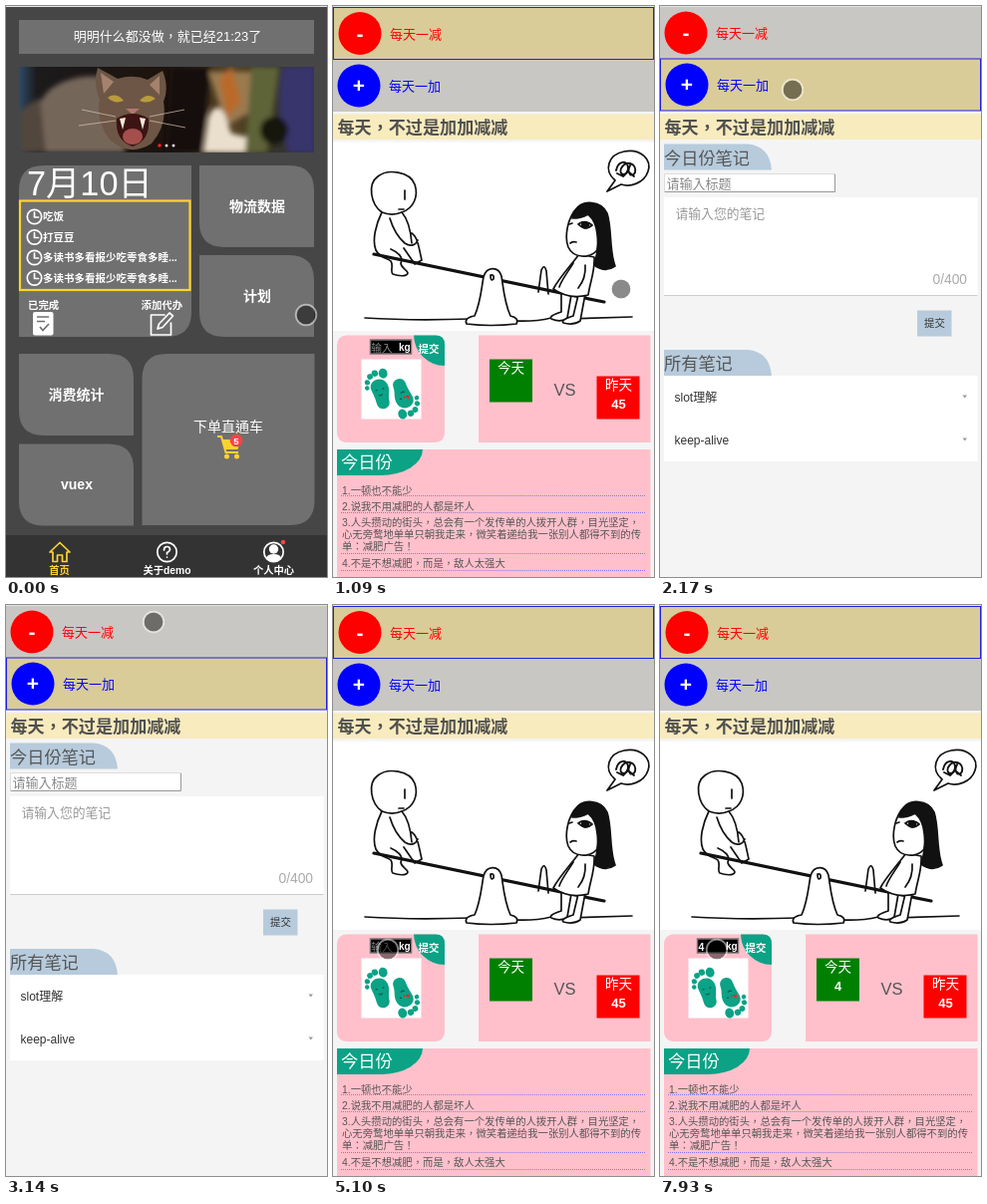
An HTML page that plays this animation: 322 px wide and 573 px high, repeating every 8 s.

```html
<!DOCTYPE html>
<html lang="zh-Hant">
<head>
<meta charset="utf-8">
<title>每天加减</title>
<style>
  html, body { margin: 0; width: 100%; height: 100%; overflow: hidden; background: #f4f4f4; }
  svg { display: block; width: 100vw; height: 100vh; }
  text { font-family: "Liberation Sans", "Noto Sans CJK TC", "Noto Sans CJK SC", sans-serif; white-space: pre; }
  .mid { text-anchor: middle; }
  .home text { fill: #fff; }
  .card { fill: #707070; }
  .b { font-weight: 700; }
  .line { fill: none; stroke: #fff; stroke-width: 1.7; stroke-linecap: round; stroke-linejoin: round; }
  .ink { fill: none; stroke: #111; stroke-width: 1.7; stroke-linecap: round; stroke-linejoin: round; }
  .pink { fill: #ffc0cb; }
  .teal { fill: #0ba286; }
  .blue { fill: #b7cbdc; }
  .list text { font-size: 10.35px; fill: #555; }
  .dots { fill: none; stroke: #8a78e8; stroke-dasharray: 1 1; }
  .tab { font-size: 17.2px; fill: #555; }
</style>
</head>
<body>
<svg viewBox="0 0 322 573">
  <defs>
    <clipPath id="photo"><rect x="13" y="61" width="296" height="86"/></clipPath>
    <filter id="soft"><feGaussianBlur stdDeviation="2.5"/></filter>
    <linearGradient id="scene">
      <stop offset="0" stop-color="#2f4a68"/><stop offset=".06" stop-color="#1c1a1c"/>
      <stop offset=".5" stop-color="#1d130d"/><stop offset=".72" stop-color="#5a4526"/>
      <stop offset=".84" stop-color="#35351f"/><stop offset="1" stop-color="#35305c"/>
    </linearGradient>
    <g id="clock" class="line"><circle r="7.2"/><path d="M0-4.5V.5H4"/></g>
    <path id="small" class="card" d="M0 0H90Q115 0 115 25V82H25Q0 82 0 57Z"/>
    <path id="large" class="card" d="M25 0H173V147Q173 172 148 172H0V25Q0 0 25 0Z"/>
    <path id="flag" class="blue" d="M0 0H84Q106 2 108 26H0Z"/>
    <g id="foot" class="teal">
      <path d="M-8-4C-9-14 6-16 9-6C11 1 7 5 7 11C7 20-6 20-6 11C-6 5-7 2-8-4Z"/>
      <circle cx="-10" cy="-12" r="2.6"/><circle cx="-6" cy="-17" r="2.9"/>
      <circle cx="-.5" cy="-19" r="3.2"/><ellipse cx="7.5" cy="-17" rx="4.4" ry="5"/>
      <circle cx="-11.5" cy="-6.5" r="2.3"/>
      <path d="M-4-2h2M3-2h2M-2 3q2 2 4 0" fill="none" stroke="#064f42"/>
    </g>
  </defs>

  <g id="home" class="home">
    <rect width="322" height="573" fill="#464646"/>
    <rect class="card" x="13" y="14" width="296" height="34"/>
    <text class="mid" x="162" y="35" font-size="13">明明什么都没做，就已经21:23了</text>

    <g clip-path="url(#photo)">
      <rect x="13" y="61" width="296" height="86" fill="url(#scene)"/>
      <g filter="url(#soft)">
        <path d="M30 147Q22 104 44 84Q68 66 104 72L120 147Z" fill="#75665a"/>
        <path d="M13 105L34 92L40 147H13Z" fill="#51463c"/>
        <path d="M165 61H206L196 147H160Z" fill="#120d0b"/>
        <path d="M203 66H262L250 104L221 120Z" fill="#9a7a50"/>
        <path d="M198 147L203 112Q210 94 219 108L226 128L244 132V147Z" fill="#eadfcd"/>
        <path d="M214 74L226 61L236 96L222 112Z" fill="#b96a2c"/>
        <path d="M246 61H274L262 147H240Z" fill="#5e6437"/>
        <path d="M278 61H309V147H284Q268 102 278 61Z" fill="#39346c"/>
        <circle cx="269" cy="125" r="14" fill="#17140f"/>
      </g>
      <path d="M92 62L112 73Q128 68 142 74L157 65Q164 82 158 96Q162 120 146 138Q124 152 104 134Q90 116 94 94Q87 78 92 62Z" fill="#6d5645"/>
      <path d="M95 67L108 76L98 88ZM154 70L144 79L154 89Z" fill="#a5826e"/>
      <path d="M102 92Q110 86 118 95Q109 99 102 92ZM134 95Q142 86 150 93Q142 99 134 95Z" fill="#b99c3c"/>
      <path d="M120 103H134L127 109Z" fill="#b2786d"/>
      <path d="M111 113Q127 103 143 113Q145 135 127 141Q109 135 111 113Z" fill="#3c1413"/>
      <ellipse cx="127" cy="131" rx="10" ry="8" fill="#a54f4d"/>
      <path d="M114 113L117 124L120 112M134 112L137 124L140 113" fill="#f4ead7"/>
      <path d="M110 111L76 104M110 115L73 120M144 111L179 104M144 115L180 122" stroke="#d7c8b6" stroke-width=".7"/>
    </g>
    <circle cx="154" cy="140" r="1.7" fill="#f22"/>
    <circle cx="161" cy="140" r="1.5" fill="#ddd"/><circle cx="168" cy="140" r="1.5" fill="#ddd"/>

    <use href="#large" x="13" y="160"/>
    <use href="#small" x="194" y="160"/><use href="#small" x="194" y="250"/>
    <use href="#small" x="13" y="349"/><use href="#small" x="13" y="439.500"/>
    <use href="#large" x="136.500" y="349"/>

    <text x="21" y="190" font-size="34.300" font-weight="300">7月10日</text>
    <rect x="14" y="195.500" width="170.500" height="89.500" fill="none" stroke="#fdd330" stroke-width="2.200"/>
    <g class="b" font-size="10.500">
      <use href="#clock" x="28.500" y="211.500"/><text x="37" y="215">吃饭</text>
      <use href="#clock" x="28.500" y="232"/><text x="37" y="236">打豆豆</text>
      <use href="#clock" x="28.500" y="252.500"/><text x="37" y="256">多读书多看报少吃零食多睡...</text>
      <use href="#clock" x="28.500" y="273"/><text x="37" y="277">多读书多看报少吃零食多睡...</text>
    </g>
    <g class="b" font-size="10.400"><text x="22" y="304">已完成</text><text x="135.500" y="304">添加代办</text></g>
    <rect x="27" y="307" width="20.500" height="23.500" rx="2" fill="#fff"/>
    <path d="M31 312H43M31 316.500H39M34 322L37 325.500L43 319" fill="none" stroke="#707070" stroke-width="1.700"/>
    <path class="line" d="M159 310H145.500V330H165.500V318M152 324L153.500 319L164 308L167.500 311L157 322.500Z"/>

    <g class="b mid" font-size="14">
      <text x="252" y="206">物流数据</text><text x="252" y="296">计划</text>
      <text x="70.500" y="395">消费统计</text><text x="71" y="485">vuex</text>
      <text x="223" y="427" font-weight="400">下单直通车</text>
    </g>
    <path d="M212 432H216L220.500 448H233" fill="none" stroke="#fdd330" stroke-width="2"/>
    <path d="M216.500 435H235L232.500 445H219.500Z" fill="#fdd330"/>
    <circle cx="221.500" cy="452" r="2.500" fill="#fdd330"/><circle cx="231.500" cy="452" r="2.500" fill="#fdd330"/>
    <circle cx="231" cy="436" r="6.300" fill="#f44545"/>
    <text class="mid b" x="231" y="439.500" font-size="9.500">5</text>

    <rect y="531" width="322" height="42" fill="#333"/>
    <path class="line" style="stroke:#fdd330" d="M44 548L54 538.500L64 548H61V557.500H56.500V551H51.500V557.500H47V548Z"/>
    <g class="line"><circle cx="161.500" cy="548" r="9.700"/><path d="M158.500 546Q158.500 542.500 161.500 542.500T164.500 545.500Q164 547.500 161.500 548.500V550M161.500 553V553.100"/></g>
    <circle class="line" cx="268.500" cy="548" r="9.700"/>
    <circle cx="268.500" cy="545" r="4.700" fill="#fff"/>
    <path d="M261 554Q262 550 268.500 550T276 554Q268.500 561 261 554Z" fill="#fff"/>
    <circle cx="278" cy="538" r="2.300" fill="#f44545"/>
    <g class="b mid" font-size="10.300">
      <text x="53.500" y="569.500" style="fill:#fdd330">首页</text>
      <text x="161.500" y="569.500">关于demo</text><text x="268.500" y="569.500">个人中心</text>
    </g>
  </g>

  <g id="daily">
    <rect width="322" height="573" fill="#f4f4f4"/>
    <g id="rows"></g>
    <rect y="108.500" width="322" height="25.500" fill="#f8ebbd"/>
    <text x="4.500" y="128" font-size="17.100" font-weight="700" fill="#505050">每天，不过是加加减减</text>
  </g>

  <g id="minus">
    <rect y="136.500" width="322" height="189.500" fill="#fff"/>
    <g class="ink">
      <path d="M32 313Q80 316 138 314M183 316Q202 317 219 313M232 314L300 312"/>
      <path d="M206 287L209 265Q212 258 214 266L216 289" fill="#fff"/>
      <path d="M49 207C38 199 34 179 45 171C55 163 77 166 82 179C86 191 81 203 69 207C62 210 54 209 49 207" fill="#fff"/>
      <path d="M72 185V194M66 204H71"/>
      <path d="M49 207C43 219 39 235 43 245C47 253 55 253 58 256C61 260 57 267 60 269C65 271 74 272 75 268C74 264 68 263 68 258C71 252 65 247 58 244M69 207C76 215 78 226 79 238M57 213C60 223 64 231 72 238C78 242 83 240 85 235M79 228C85 232 86 242 89 255L82 259L71 243"/>
      <path d="M41 249L272 297" stroke-width="3.200"/>
      <path d="M142 311C148 298 149 282 151 272C154 261 166 261 169 271C171 284 172 298 178 311Q187 313 184 319Q158 322 134 319Q131 313 142 311Z" fill="#fff"/>
      <path d="M158 270Q162 269 161 274Q158 277 158 270"/>
      <path d="M229 287L229 307Q216 311 219 314Q229 318 235 313L239 290M246 290L241 311Q228 315 231 318Q241 321 248 316L253 289" fill="#fff"/>
      <path d="M247 249C238 261 226 274 221 284C231 291 244 293 256 290C258 276 263 266 262 252Z" fill="#fff"/>
      <path d="M241 258C235 268 229 275 227 282M253 260Q254 273 246 283"/>
      <path d="M245 203C235 212 232 232 236 242C241 253 257 254 265 245L272 215Z" fill="#fff"/>
      <path d="M243 205C250 194 269 195 275 208C280 224 277 246 283 261Q273 268 262 260Q267 244 265 229Q264 216 256 209Q249 213 240 213Q240 208 243 205Z" fill="#111"/>
      <path d="M246 219Q253 214 260 220Q253 226 246 219M237 219L240 218M238 238Q241 236 244 237"/>
      <ellipse cx="253" cy="220" rx="3.500" ry="3" fill="#111"/>
      <path d="M283 175C271 165 276 149 292 146C309 143 320 154 316 166C312 178 298 182 289 179L275 186Z" fill="#fff"/>
      <path d="M284 165C286 155 296 154 296 163C295 172 286 170 289 163C294 154 305 158 303 167C300 173 294 168 298 160M285 168L291 171L296 166L302 171" stroke-width="1.900"/>
    </g>

    <rect class="pink" x="4" y="330.500" width="108" height="107.500" rx="9"/>
    <path class="teal" d="M81 330.500H103Q112 330.500 112 339.500V361A31 31 0 0 1 81 330.500Z"/>
    <text class="b" x="85.500" y="348" font-size="10.500" fill="#fff">提交</text>
    <rect x="37.500" y="335" width="41" height="14" fill="#000" stroke="#777" stroke-width="1.500"/>
    <text id="hint" x="38.500" y="346.500" font-size="10.500" fill="#8a8a8a">输入</text>
    <text id="typed" class="b" x="38.500" y="346.500" font-size="10.500" fill="#fff">4</text>
    <rect id="caret" x="39" y="337" width="1" height="11" fill="#fff"/>
    <text class="b" x="66" y="345.500" font-size="10" fill="#fff">kg</text>
    <rect x="28.500" y="354.500" width="60" height="60" fill="#fff"/>
    <use href="#foot" transform="translate(47 387) rotate(-14)"/>
    <use href="#foot" transform="translate(71 391) rotate(160)"/>
    <path d="M71 391L77 395V390L71 394Z" fill="#d8352f"/>

    <rect class="pink" x="146" y="330.500" width="172.500" height="107.500"/>
    <rect x="157" y="354.500" width="43" height="43" fill="#008000"/>
    <rect x="264.500" y="371.500" width="43" height="43" fill="#f00"/>
    <g class="mid" font-size="13.600" fill="#fff">
      <text x="178.500" y="368">今天</text><text x="286.500" y="385">昨天</text>
      <text class="b" id="today" x="178.500" y="387" font-size="13">4</text>
      <text class="b" x="286.500" y="404" font-size="13">45</text>
    </g>
    <text class="mid" x="232.500" y="391" font-size="16.500" fill="#555">VS</text>

    <rect class="pink" x="4" y="445" width="314.500" height="128"/>
    <path class="teal" d="M4 445H90A42 26 0 0 1 48 471H4Z"/>
    <text x="8" y="464" font-size="17.300" fill="#fff">今日份</text>
    <g class="list">
      <text x="9" y="489.500">1.一顿也不能少</text>
      <text x="9" y="505.500">2.说我不用减肥的人都是坏人</text>
      <text x="9" y="522">3.人头攒动的街头，总会有一个发传单的人拨开人群，目光坚定，</text>
      <text x="9" y="534">心无旁鹜地单单只朝我走来，微笑着递给我一张别人都得不到的传</text>
      <text x="9" y="546">单：减肥广告！</text>
      <text x="9" y="563">4.不是不想减肥，而是，敌人太强大</text>
    </g>
    <path class="dots" d="M8 491.500H314M8 508.500H314M8 549.500H314M8 566.500H314"/>
  </g>

  <g id="plus">
    <use href="#flag" x="4" y="138.500"/><text class="tab" x="4" y="158.500">今日份笔记</text>
    <rect x="4.500" y="168.500" width="171" height="18" fill="#fff"/>
    <path d="M4.500 186.500H175.500V168.500" fill="none" stroke="#999"/>
    <path d="M4.500 186.500V168.500H175.500" fill="none" stroke="#ddd"/>
    <text x="6.500" y="183" font-size="13" fill="#888">请输入标题</text>
    <rect x="4" y="192" width="314.500" height="98.500" fill="#fff"/>
    <path d="M4 290.500H318.500" stroke="#ccc"/>
    <text x="15.500" y="213" font-size="12.800" fill="#999">请输入您的笔记</text>
    <text x="308" y="279" font-size="13.800" fill="#aaa" text-anchor="end">0/400</text>
    <rect class="blue" x="258" y="305.500" width="34.500" height="26"/>
    <text class="mid" x="275.500" y="322" font-size="10.400" fill="#333">提交</text>
    <use href="#flag" x="4" y="345"/><text class="tab" x="4" y="364.500">所有笔记</text>
    <rect x="4" y="371" width="314.500" height="86" fill="#fff"/>
    <g font-size="12" fill="#333"><text x="14.500" y="397">slot理解</text><text x="14.500" y="440">keep-alive</text></g>
    <path d="M303.500 390.500H308L305.800 393.500ZM303.500 433.500H308L305.800 436.500Z" fill="#999"/>
  </g>

  <rect width="322" height="1" fill="#e4e4e4"/>
  <g id="cursor">
    <circle r="9.500" fill="#000" fill-opacity=".46"/>
    <circle r="10.300" fill="none" stroke="#fff" stroke-opacity=".5" stroke-width="1.800"/>
    <circle id="rim" r="11.500" fill="none" stroke="#333" stroke-width=".8"/>
  </g>
</svg>
<script>
  const LOOP = 8000;
  const $ = id => document.getElementById(id);
  const show = (id, on) => { $(id).style.display = on ? '' : 'none'; };

  // first step, last step, number of steps, destination
  const moves = [
    [280, 955, 6, 289, 284],
    [1360, 2050, 6, 133, 84],
    [2730, 3140, 4, 148, 17],
    [3820, 4820, 8, 60, 314],
    [4940, 5100, 2, 55, 346],
    [5240, 5370, 2, 57, 346]
  ];
  const pages = [[0, 'home'], [1090, 'minus'], [2170, 'plus'], [3270, 'minus']];
  const within = (t, a, b) => t >= a && t < b;

  function cursorAt(t) {
    let x = 301, y = 310;
    for (const [from, to, n, toX, toY] of moves) {
      if (t < from) break;
      const step = Math.floor((t - from) / (to - from) * (n - 1) + 1e-6) + 1;
      const p = Math.min(1, step / n);
      const e = p * p * (3 - 2 * p);
      x += (toX - x) * e;
      y += (toY - y) * e;
    }
    return [x, y];
  }

  function row(y, sign, label, color, active) {
    const d = active ? 1 : 0;
    const box = active
      ? `<rect x=".5" y="${y + .5}" width="321" height="52" fill="#d9cc99" stroke="#2020e0"/>`
      : `<rect y="${y}" width="322" height="52" fill="#c9c7c3"/>`;
    return box + `<circle cx="${26 + d}" cy="${y + 26 + d / 2}" r="21.500" fill="${color}"/>
      <text class="mid b" x="${26 + d}" y="${y + 33 + d / 2}" font-size="21" fill="#fff">${sign}</text>
      <text x="${56 + d}" y="${y + 31 + d / 2}" font-size="13" fill="${color}">${label}</text>`;
  }

  let page;
  function setPage(next) {
    if (next === page) return;
    page = next;
    for (const id of ['home', 'minus', 'plus']) show(id, id === page);
    show('daily', page !== 'home');
    const first = page === 'minus';
    $('rows').innerHTML =
      row(1, '-', '每天一减', '#f00', first) +
      row(first ? 54 : 52.5, '+', '每天一加', '#00f', !first);
  }

  function draw(now) {
    const t = now % LOOP;
    setPage(pages.filter(p => t >= p[0]).pop()[1]);
    const typed = t >= 7780;
    show('hint', !typed);
    show('typed', typed);
    show('today', typed);
    show('caret', within(t, 5800, 6400) || within(t, 6820, 7380));
    show('rim', within(t, 2050, 2170));
    $('cursor').setAttribute('transform', `translate(${cursorAt(t)})`);
  }

  const start = performance.now();
  function tick() {
    draw(performance.now() - start);
    requestAnimationFrame(tick);
  }
  tick();
</script>
</body>
</html>
```
